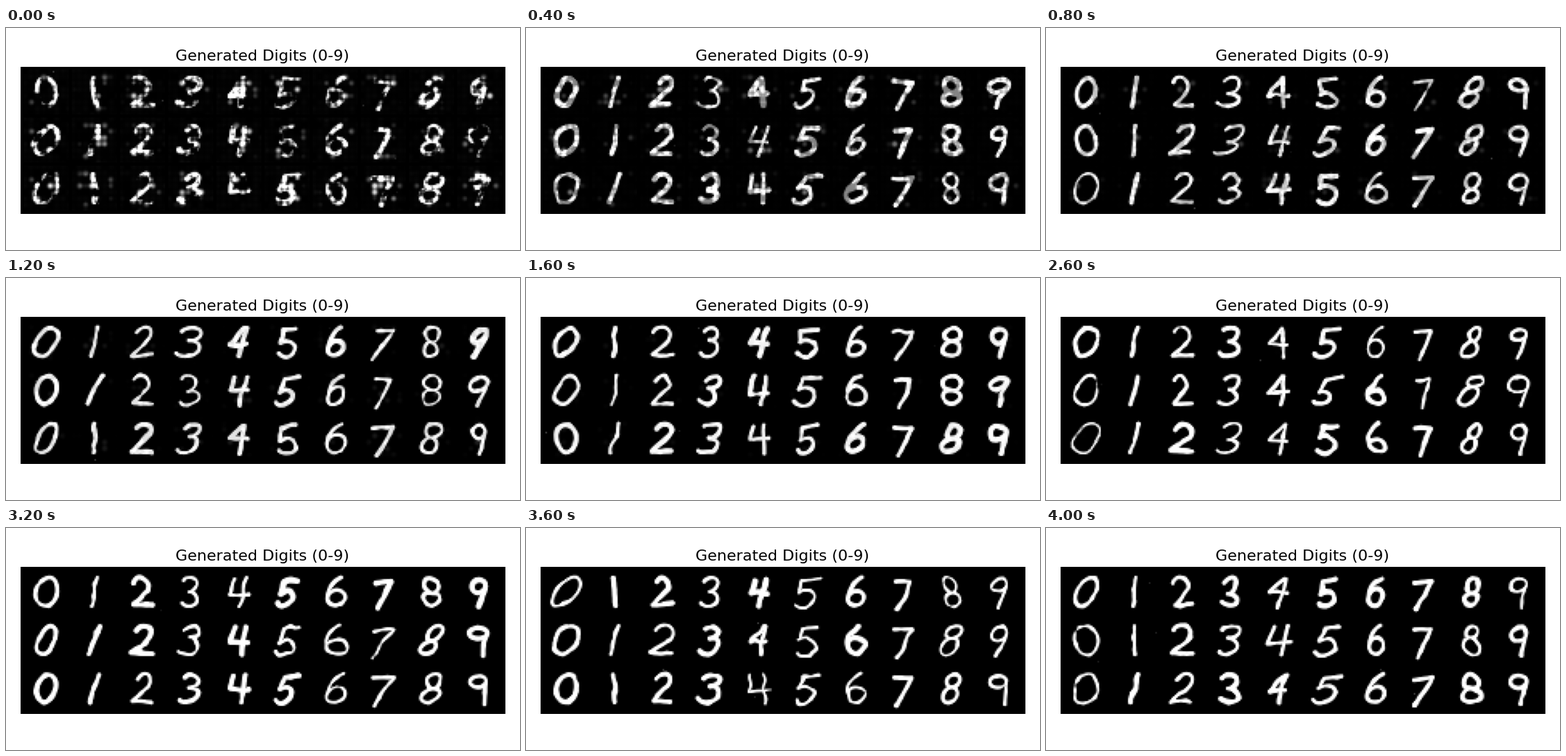
Animation of 740 by 320 pixels, one loop 4200 ms. Source, as a matplotlib script:

```python
import numpy as np
import matplotlib.pyplot as plt
from matplotlib.animation import FuncAnimation

WIDTH, HEIGHT, DPI = 740, 320, 100
FRAMES, INTERVAL = 21, 200
ROWS, DIGITS, CELL, GAP = 3, 10, 28, 2
PITCH = CELL + GAP

PIXELS = np.stack(np.meshgrid(np.arange(CELL), np.arange(CELL)), -1)
KNOTS = np.arange(0, CELL + 1, 4)
BUMPS = np.exp(-((np.arange(CELL)[:, None] - KNOTS) / 1.8) ** 2)


def arc(x, y, rx, ry, start, end):
    """Elliptic arc; degrees run clockwise from the right, y points down."""
    angle = np.radians(np.linspace(start, end, 50))
    return np.column_stack([x + rx * np.cos(angle), y + ry * np.sin(angle)])


def line(*points):
    """Straight pen moves through the points."""
    p = np.array(points, float)
    t = np.linspace(0, len(p) - 1, 20 * len(p))
    return np.column_stack([np.interp(t, range(len(p)), axis) for axis in p.T])


def bowl(top, bottom, width, start, end):
    """Arc that fills the height between top and bottom."""
    return arc(.3, (top + bottom) / 2, width, (bottom - top) / 2, start, end)


def strokes(digit, rng):
    """Pen strokes of a digit in a unit-high box, split at a random waist."""
    waist = rng.uniform(.4, .55)
    wide = rng.uniform(.24, .32)
    left, right = .3 - wide, .3 + wide
    top = rng.choice([.1, .45])
    if digit == 0:
        return [bowl(0, 1, wide + .08, -90, 270)]
    if digit == 1:
        return [line((.3, 0), (.3, 1))]
    if digit == 2:
        return [bowl(0, waist + .1, wide, -155, 35),
                line((.3 + .82 * wide, waist * .78 + .08), (left, .96), (.7, .96))]
    if digit == 3:
        return [bowl(0, waist, wide, -150, 90), bowl(waist, 1, wide + .05, -90, 145)]
    if digit == 4:
        return [line((top, 0), (left, waist + .06), (right + .1, waist + .04)),
                line((.5, 0), (.5, 1))]
    if digit == 5:
        return [line((right + .1, 0), (.15, .04), (.1, waist)),
                bowl(waist - .06, 1, wide + .05, -130, 145)]
    if digit == 6:
        return [arc(right, .72, 2 * wide, .72, -110, -180),
                bowl(waist, 1, wide, 180, -180)]
    if digit == 7:
        return [line((left, .1), (right, .08), (.28, 1))]
    if digit == 8:
        return [bowl(0, waist, wide - .03, -90, 270), bowl(waist, 1, wide, -90, 270)]
    return [bowl(0, waist, wide, 0, -360), line((right, waist / 2), (.5, 1))]


def blobs(values):
    """Smooth field of soft spots, one per knot."""
    return BUMPS @ values @ BUMPS.T


def handwriting(digit, rough, rng):
    """One digit in a random hand, fitted to 20 pixels and centred."""
    pen = np.concatenate(strokes(digit, rng))
    pen += .04 * np.sin(pen @ rng.normal(0, 4, (2, 2)) + rng.uniform(0, 6.3, 2))
    lean = rng.normal(.18, .22 if digit == 1 else .14)
    pen[:, 0] -= np.clip(lean, -.12, .7) * (pen[:, 1] - .5)
    weight = np.clip(rng.normal(1.3, .25), .8, 1.9) + .3 * rough
    low, high = pen.min(0), pen.max(0)
    pen = (pen - (low + high) / 2) * (20.2 - 2 * weight) / (high - low).max()
    pen += CELL / 2 - .5 - .5 * pen.mean(0)
    gap = np.hypot(*np.moveaxis(PIXELS[:, :, None] - pen, -1, 0)).min(2)
    uneven = blobs(rng.normal(0, .3, 2 * KNOTS.shape))
    return np.clip((weight + .4 - gap + uneven) * 1.2, 0, 1)


def sample(frame, row, digit):
    """Digit as drawn by a generator that gets cleaner with every frame."""
    rng = np.random.default_rng([frame, row, digit])
    rough = np.exp(-.36 * frame)
    grid = 2 * KNOTS.shape
    ink = handwriting(digit, rough, rng)

    broken = np.clip(4.5 * blobs(rng.random(grid)) - .6, 0, 1)
    near = np.exp(-(((PIXELS - 14) / 10) ** 4).sum(-1))
    ghosts = blobs((rng.random(grid) < .16) * rng.random(grid))
    image = ink * (1 - rough + rough * broken)
    image += rough * near * np.clip(1.4 * ghosts - .15, 0, 1)
    image += .03 * rough * blobs(rng.random(grid))

    if rng.random() < .12:
        y, x = rng.integers(0, CELL, 2)
        image[y, x] += rng.uniform(.05, .3)
    return np.clip(image, 0, 1)


def sheet(frame):
    canvas = np.zeros((ROWS * PITCH + GAP, DIGITS * PITCH + GAP))
    for row in range(ROWS):
        for digit in range(DIGITS):
            y, x = GAP + row * PITCH, GAP + digit * PITCH
            canvas[y:y + CELL, x:x + CELL] = sample(frame, row, digit)
    return canvas


fig = plt.figure(figsize=(WIDTH / DPI, HEIGHT / DPI), dpi=DPI, facecolor="white")
ax = fig.add_axes([20.51 / WIDTH, 51.8 / HEIGHT, 698 / WIDTH, 212.64 / HEIGHT])
ax.axis("off")
ax.set_title("Generated Digits (0-9)", fontsize=16, fontfamily="DejaVu Sans")

sheets = [sheet(frame) for frame in range(FRAMES)]
picture = ax.imshow(sheets[0], cmap="gray", vmin=0, vmax=1, aspect="auto")


def update(frame):
    picture.set_data(sheets[frame])
    return [picture]


animation = FuncAnimation(fig, update, frames=FRAMES, interval=INTERVAL,
                          repeat=True, repeat_delay=0)
plt.show()
```
